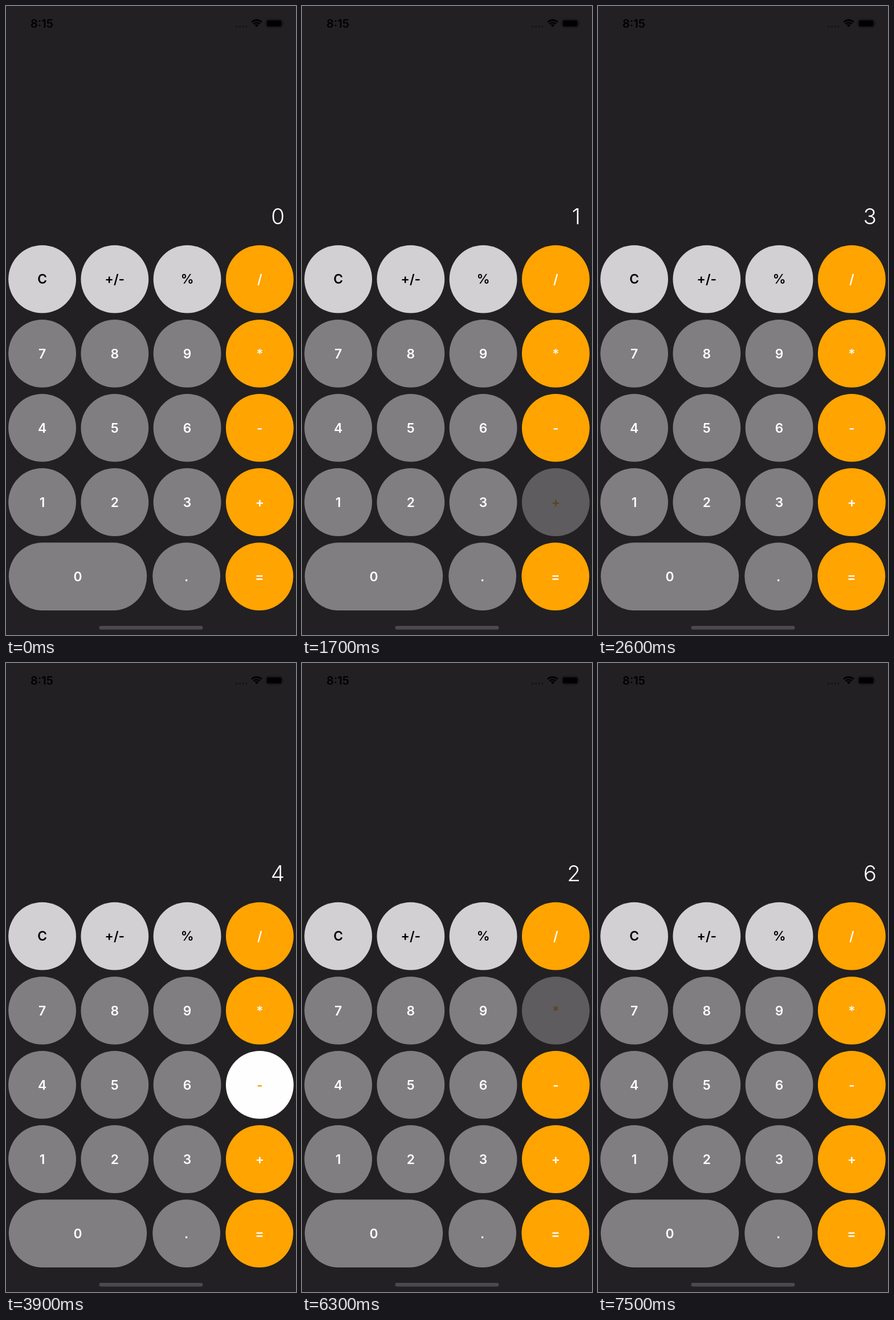
Write an HTML page that moves like this. It is 509x1101 px and loops after 8000 ms.

```html
<!DOCTYPE html>
<html lang="en">
<head>
<meta charset="utf-8">
<title>Calculator</title>
<style>
  html, body { margin: 0; width: 100%; height: 100%; overflow: hidden; background: #222022; }
  svg { display: block; width: 509px; height: 1101px; }
  text { font-family: Inter, Roboto, sans-serif; }
  .key text { font-size: 22.8px; font-weight: 600; text-anchor: middle; font-feature-settings: "calt" 0; }
  .light rect { fill: #d2d0d3; }
  .light text { fill: #000; }
  .digit rect { fill: #807e80; }
  .digit text { fill: #fff; }
  .op rect { fill: #ffa400; }
  .op text { fill: #fff; }
  .op.selected rect { fill: #fffefe; }
  .op.selected text { fill: #f5a116; }
  #display { font-size: 38.6px; font-weight: 350; fill: #fff; text-anchor: end; }
  #clock { font-size: 20px; font-weight: 600; }
</style>
</head>
<body>
<svg viewBox="0 0 509 1101">
  <rect width="509" height="1101" fill="#222022"/>
  <text id="clock" x="43" y="37.5">8:15</text>
  <g fill="#171517">
    <circle cx="405" cy="36" r="1.8"/><circle cx="410.7" cy="36" r="1.8"/>
    <circle cx="416.4" cy="36" r="1.8"/><circle cx="422.1" cy="36" r="1.8"/>
  </g>
  <g id="wifi" fill="none" stroke="#000" stroke-width="2.9"></g>
  <rect x="456.2" y="23.4" width="28.8" height="14.2" rx="4.2" fill="none" stroke="#151315" stroke-width="1.2"/>
  <rect x="457.8" y="25" width="25.6" height="11" rx="2.8"/>
  <path d="M486.3 28.2q2 2.3 0 4.6z" fill="#151315"/>
  <text id="display" x="489" y="381.5">0</text>
  <g id="keys"></g>
  <rect x="163.5" y="1085" width="182" height="6.4" rx="3.2" fill="#4b494b"/>
</svg>
<script>
const NS = "http://www.w3.org/2000/svg";
const LOOP = 8000, STEP = 100, SIZE = 118.8;
const $ = id => document.getElementById(id);

function add(parent, tag, attrs, text) {
  const el = document.createElementNS(NS, tag);
  for (const name in attrs) el.setAttribute(name, attrs[name]);
  if (text) el.textContent = text;
  return parent.appendChild(el);
}

// Wi-Fi fan: two bands and a wedge on a 45 degree spread
const fan = r => {
  const d = r * Math.SQRT1_2;
  return `M${440 - d} ${37 - d}A${r} ${r} 0 0 1 ${440 + d} ${37 - d}`;
};
[12.2, 7.9].forEach(r => add($("wifi"), "path", { d: fan(r) }));
add($("wifi"), "path", { d: fan(5) + "L440 37Z", fill: "#000", stroke: "none" });

const keys = {};
function addKey(label, kind, cx, cy, width = SIZE) {
  const g = add($("keys"), "g", { class: "key " + kind });
  add(g, "rect", { x: cx - width / 2, y: cy - SIZE / 2, width, height: SIZE, rx: SIZE / 2 });
  add(g, "text", { x: cx, y: cy + 8.2 }, label);
  keys[label] = g;
}

const rows = [["C", "+/-", "%", "/"], ["7", "8", "9", "*"], ["4", "5", "6", "-"], ["1", "2", "3", "+"]];
rows.forEach((row, r) => row.forEach((label, c) => {
  const kind = c === 3 ? "op" : r === 0 ? "light" : "digit";
  addKey(label, kind, 63.6 + 127.25 * c, 478.2 + 130.1 * r);
}));
addKey("0", "digit", 126, 998.6, 242.4);
addKey(".", "digit", 316.7, 998.6);
addKey("=", "op", 444.8, 998.6);

// Each press: time, key, display afterwards, selected operator, fade steps
const quick = [0.27, 0.73, 1], slow = [0.27, 0.55, 0.88, 1];
const presses = [
  { at: 500, key: "1", shown: "1", fade: quick },
  { at: 1700, key: "+", shown: "1", op: "+", fade: slow },
  { at: 2400, key: "3", shown: "3", fade: quick },
  { at: 3700, key: "-", shown: "4", op: "-", fade: quick },
  { at: 5300, key: "2", shown: "2", fade: quick },
  { at: 6300, key: "*", shown: "2", op: "*", fade: quick },
  { at: 7200, key: "6", shown: "6", fade: slow }
];
const idle = { at: 0, shown: "0", fade: [1] };

function render(t) {
  const now = presses.filter(p => p.at <= t).pop() || idle;
  const step = Math.min(Math.floor((t - now.at) / STEP), now.fade.length - 1);
  $("display").textContent = now.shown;
  for (const label in keys) {
    keys[label].classList.toggle("selected", label === now.op);
    keys[label].setAttribute("opacity", label === now.key ? now.fade[step] : 1);
  }
}

const start = performance.now();
function tick() {
  render((performance.now() - start) % LOOP);
  requestAnimationFrame(tick);
}
tick();
</script>
</body>
</html>
```
